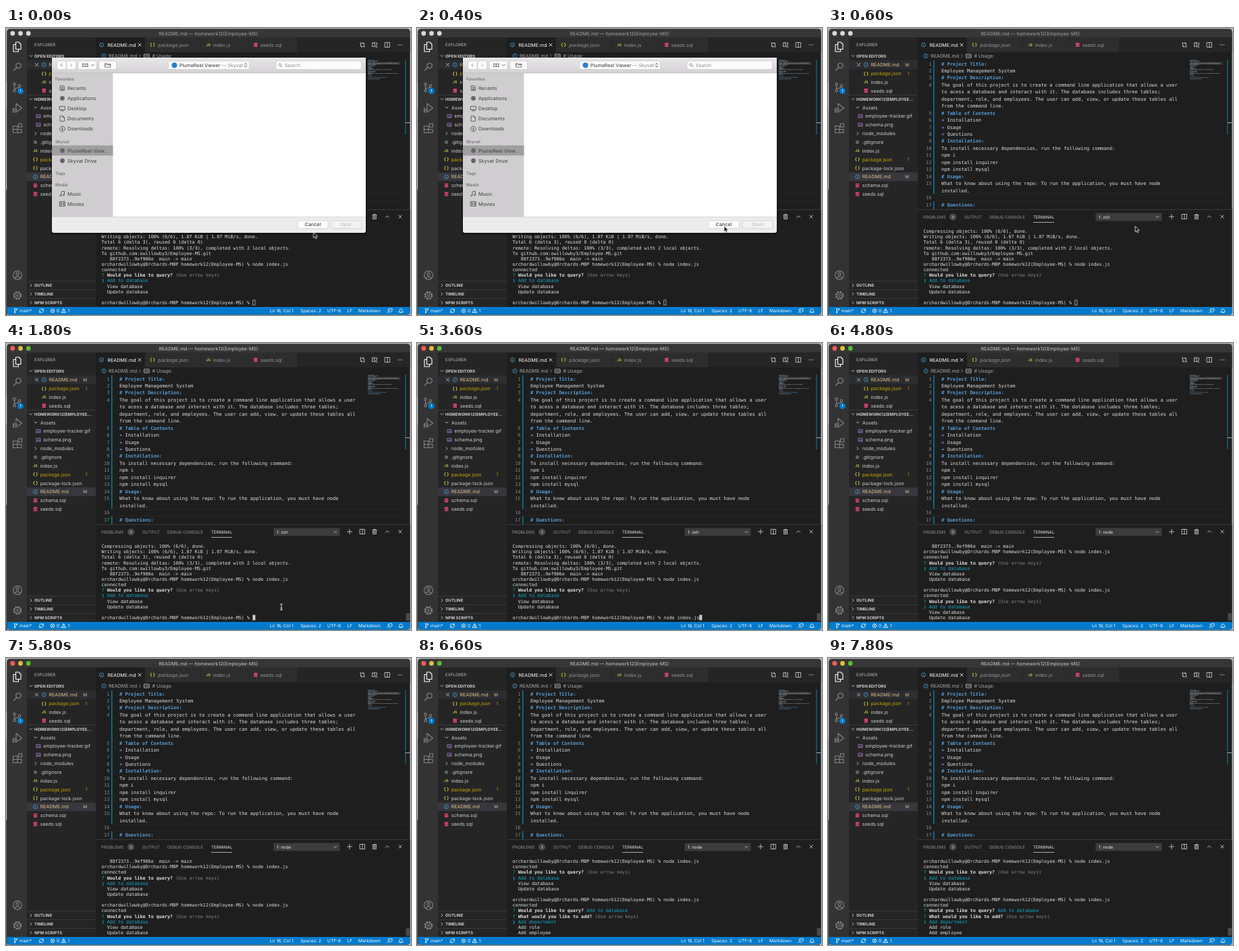
Recreate the animation shown at these times as an HTML page. Size 600 px wide and 426 px high, loop 8000 ms.

```html
<!DOCTYPE html>
<html lang="en">
<head>
<meta charset="utf-8">
<title>Editor session</title>
<style>
html, body { margin: 0; width: 100%; height: 100%; overflow: hidden; background: #1e1e1e; }
svg { display: block; width: 100vw; height: 100vh; }
text { font-family: Inter, Roboto, sans-serif; white-space: pre; text-rendering: geometricPrecision; }
.mono { font-family: "DejaVu Sans Mono", "Liberation Mono", monospace; }
.bold { font-weight: 700; }
.semi { font-weight: 600; }
.italic { font-style: italic; }
.mid { text-anchor: middle; }
.end { text-anchor: end; }
.green { fill: #0dbc79; }
.cyan { fill: #11a8cd; }
.hint { fill: #858585; }
.line { fill: none; stroke-linecap: round; stroke-linejoin: round; }
#pointer { animation: travel 8s linear infinite; }
@keyframes travel {
  0% { transform: translate(455.5px, 303px); }
  2.5%, 12.5% { transform: translate(455px, 294px); }
  20%, 100% { transform: translate(408px, 388px); }
}
</style>
</head>
<body>
<svg id="stage" viewBox="0 0 600 426" preserveAspectRatio="none"></svg>
<script>
const LOOP = 8000;
const CLOSE = 590, FOCUS = 1600, TYPE = 2500, RUN = 4400, PICK = 6000;
const KEY = 80;
let css = '', spans = 0;

const rect = (x, y, w, h, fill, more = '') =>
  `<rect x="${x}" y="${y}" width="${w}" height="${h}" fill="${fill}" ${more}/>`;
const dot = (x, y, r, fill, more = '') =>
  `<circle cx="${x}" cy="${y}" r="${r}" fill="${fill}" ${more}/>`;
const path = (x, y, d, color, width = 0.9) =>
  `<path class="line" transform="translate(${x} ${y})" d="${d}" stroke="${color}" stroke-width="${width}"/>`;
// y is the middle of the capitals
const text = (x, y, size, fill, str, cls = '') =>
  `<text x="${x}" y="${y + size * 0.36}" font-size="${size}" fill="${fill}" class="${cls}">${str}</text>`;
const tint = (cls, str) => `<tspan class="${cls}">${str}</tspan>`;

// Shows content only between two times of the loop
const span = (from, to, content) => {
  const name = `span${spans++}`;
  css += `@keyframes ${name}{0%{opacity:${from ? 0 : 1}}${from / LOOP * 100}%{opacity:1}` +
    `${to / LOOP * 100}%,100%{opacity:${to === LOOP ? 1 : 0}}}`;
  return `<g style="animation:${name} ${LOOP}ms step-end infinite">${content}</g>`;
};

const shapes = {
  down: 'M-2-1L0 1L2-1', up: 'M-2.6 1.3L0-1.3L2.6 1.3', right: 'M-1-2L1 0L-1 2', left: 'M1-2L-1 0L1 2',
  cross: 'M-2.2-2.2L2.2 2.2M2.2-2.2L-2.2 2.2', plus: 'M-3.5 0H3.5M0-3.5V3.5',
  split: 'M-3.5-3.5H3.5V3.5H-3.5ZM0-3.5V3.5',
  trash: 'M-3-2.5H3M-1-2.5V-3.6H1V-2.5M-2.4-2.5V3.5H2.4V-2.5M-.8-1V2M.8-1V2',
  branch: 'M-1.5-2V2M1.5-1.5C1.5 .5-1.5 0-1.5 1.5M-1.5-3.4a.7.7 0 1 0 .01 0M1.5-3a.7.7 0 1 0 .01 0M-1.5 2a.7.7 0 1 0 .01 0',
  lens: 'M1.5-5a3.8 3.8 0 1 0 .01 0M-1.2 1.5L-5.5 6'
};
const icon = (x, y, shape, color = '#c5c5c5', width = 0.9) => path(x, y, shapes[shape], color, width);

const fileIcon = {
  info: (x, y) => dot(x, y, 3, 'none', 'stroke="#4596c7" stroke-width=".9"') + text(x, y, 5, '#4596c7', 'i', 'mid bold'),
  json: (x, y) => text(x, y, 6.6, '#cbcb41', '{ }', 'mid bold'),
  js: (x, y) => text(x, y, 5.2, '#cbcb41', 'JS', 'mid bold'),
  sql: (x, y) => [-3, -0.9, 1.2].map(d => rect(x - 2.9, y + d, 5.8, 1.7, '#e0456e', 'rx=".8"')).join(''),
  image: (x, y) => path(x, y, 'M-2.8-2.4H2.8V2.2H-2.8ZM-2 1.4L-.4-.6L.7.8L1.4 0L2.4 1.4', '#a074c4'),
  dotfile: (x, y) => dot(x, y, 2.6, '#53656f')
};

function windowFrame() {
  const lights = colors => colors.map((c, i) => dot(9.8 + i * 11.7, 8, 3.4, c)).join('');
  const caption = 'README.md — homework12(Employee-MS)';
  return rect(0, 0, 600, 426, '#b9bcbb') +
    rect(0, 240, 2, 186, '#566057') + rect(0, 80, 2, 40, '#d8dcdc') +
    rect(1.5, 1.5, 597, 424, '#1e1e1e', 'rx="4"') +
    `<path d="M1.5 14V6q0-4.5 4.5-4.5H594q4.5 0 4.5 4.5V14Z" fill="#363636"/>` +
    span(0, FOCUS, lights(['#d8d8d8', '#d8d8d8', '#d8d8d8']) + text(300, 8, 7.05, '#a5a5a5', caption, 'mid')) +
    span(FOCUS, LOOP, lights(['#fc5b57', '#e5bf3c', '#57c038']) + text(300, 8, 7.05, '#cccccc', caption, 'mid'));
}

function activityBar() {
  const gray = '#858585';
  return rect(1.5, 14, 29.5, 400, '#333333') +
    path(16.5, 28, 'M-2-7H2.5L5.5-4V3.5H-2ZM-2-3.5H-5.5V7H2V3.5', '#ffffff', 1.1) +
    icon(17, 57, 'lens', gray, 1.2) +
    path(16, 88, 'M-3.5-6.5a1.8 1.8 0 1 0 .01 0M4-4a1.8 1.8 0 1 0 .01 0M-3.5 3a1.8 1.8 0 1 0 .01 0M-3.5-3V3M4-.4C4 2-3 0-3.5 3', gray, 1.1) +
    dot(21.3, 93.5, 4.6, '#007acc') + text(21.3, 93.5, 5.2, '#fff', '1', 'mid semi') +
    path(17, 119, 'M-2-1V-7L6.5 0L0 4.5M-4 0a2.4 3 0 1 0 .01 0M-7 1L-5.8 2M-7 6L-5.8 5M-1 1L-2.2 2M-1 6L-2.2 5M-6 3H-2', gray, 1.1) +
    path(17, 149, 'M-6.5-3.5H0V6.5H-6.5ZM-6.5 1.5H6V6.5H0M1.5-7H6.5V-2H1.5Z', gray, 1.1) +
    dot(17, 367, 6.4, 'none', `stroke="${gray}" stroke-width="1.1"`) +
    path(17, 367, 'M0-3.6a2.1 2.1 0 1 0 .01 0M-4 4.6C-3.4 1.4 3.4 1.4 4 4.6', gray, 1.1) +
    dot(17, 397, 5.3, 'none', `stroke="${gray}" stroke-width="2" stroke-dasharray="2.6 1.56"`) +
    dot(17, 397, 4.2, 'none', `stroke="${gray}" stroke-width="1"`) +
    dot(17, 397, 1.6, 'none', `stroke="${gray}" stroke-width="1"`);
}

function sidebar() {
  const plain = '#d0d0d0', warn = '#cca700', changed = '#e2c08d';
  const heading = (y, str, shape) => icon(37, y, shape) + text(42, y, 6, plain, str, 'bold');
  const border = y => rect(31, y, 102, 0.6, '#474748');
  const file = (x, y, kind, name, color = plain, mark = '', cls = '') =>
    fileIcon[kind](x - 7.2, y) + text(x, y, 7.1, color, name, cls) +
    (mark ? text(120, y, 6.4, color, mark, 'end') : '');
  const folder = (y, name, shape) => icon(44, y, shape) + text(51, y, 7.1, plain, name);
  const pitch = 12.85;
  const row = n => 118 + n * pitch;
  return rect(31, 14, 102, 400, '#252526') +
    text(42, 25, 6.1, '#bbbbbb', 'EXPLORER') +
    heading(41.5, 'OPEN EDITORS', 'down') +
    rect(31, 48, 102, pitch, '#2c2d30') + icon(45.5, 54.5, 'cross') +
    file(63.5, 54.5, 'info', 'README.md', changed, 'M') +
    file(63.5, 67.3, 'json', 'package.json', warn, '1', 'italic') +
    file(63.5, 80, 'js', 'index.js') +
    file(63.5, 93, 'sql', 'seeds.sql') +
    border(99.2) + heading(105.6, 'HOMEWORK12(EMPLOYEE…', 'down') +
    folder(row(0), 'Assets', 'down') +
    file(55.3, row(1), 'image', 'employee-tracker.gif') +
    file(55.3, row(2), 'image', 'schema.png') +
    folder(row(3), 'node_modules', 'right') +
    file(50.7, row(4), 'dotfile', '.gitignore') +
    file(50.7, row(5), 'js', 'index.js') +
    file(50.7, row(6), 'json', 'package.json', warn, '1') +
    file(50.7, row(7), 'json', 'package-lock.json') +
    rect(31, row(7.5), 102, pitch, '#37373d') +
    file(50.7, row(8), 'info', 'README.md', changed, 'M') +
    file(50.7, row(9), 'sql', 'schema.sql') +
    file(50.7, row(10), 'sql', 'seeds.sql') +
    ['OUTLINE', 'TIMELINE', 'NPM SCRIPTS'].map((name, i) => {
      const y = 382 + i * 12.8;
      return border(y - 6.4) + heading(y, name, 'right');
    }).join('');
}

function tabs() {
  return rect(133, 14, 465.5, 22, '#252526') + rect(133, 14, 72.5, 22, '#1e1e1e') +
    rect(206, 14, 82.5, 22, '#2d2d2d') + rect(289, 14, 69.5, 22, '#2d2d2d') + rect(359, 14, 72, 22, '#2d2d2d') +
    fileIcon.info(141.5, 25) + text(150.5, 25, 7.1, '#ffffff', 'README.md') + icon(198, 25, 'cross', '#e0e0e0') +
    fileIcon.json(217, 25) + text(225.3, 25, 7.1, '#969696', 'package.json', 'italic') +
    fileIcon.js(299.8, 25) + text(306.8, 25, 7.1, '#969696', 'index.js') +
    fileIcon.sql(369.8, 25) + text(376.8, 25, 7.1, '#969696', 'seeds.sql') +
    path(528, 25, 'M-2.5-3.5a1 1 0 1 0 .01 0M2.5 1.5a1 1 0 1 0 .01 0M-2.5-1.5V2.5H0M2.5 1.5V-2.5H0M-1 1.5L0 2.5L-1 3.5M1-3.5L0-2.5L1-1.5', '#c5c5c5') +
    path(546, 25, 'M-3.5 2.5V-3H3.5V0M-3.5 2.5H0M-.5-3V0M1.5 .3a1.5 1.5 0 1 0 .01 0M2.7 2.8L4 4', '#c5c5c5') +
    icon(565, 25, 'split') + [-2.6, 0, 2.6].map(d => dot(584 + d, 25, 0.7, '#c5c5c5')).join('') +
    fileIcon.info(145, 41.5) + text(152, 41.5, 7.1, '#a9a9a9', 'README.md') + icon(198.5, 41.5, 'right', '#a9a9a9', 0.7) +
    path(208.5, 41.5, 'M-3.6-2.6H3.6V2.6H-3.6ZM-2 0H-1M-.4 0H.5M1.1 0H2', '#c5c5c5') +
    text(216.5, 41.5, 7.1, '#a9a9a9', '# Usage:');
}

// A leading space marks a wrapped row
const source = [
  '# Project Title:', 'Employee Management System', '# Project Description:',
  'The goal of this project is to create a command line application that allows a user',
  ' to acess a database and interact with it. The database includes three tables;',
  ' department, role, and employees. The user can add, view, or update these tables all',
  ' from the command line.',
  '# Table of Contents', '* Installation', '* Usage', '* Questions', '# Installation:',
  'To install necessary dependencies, run the following command:',
  'npm i', 'npm install inquirer', 'npm install mysql', '# Usage:',
  'What to know about using the repo: To run the application, you must have node',
  ' installed.', '', '# Questions:'
];

function editor() {
  const top = 53, pitch = 10.45, size = 7.01;
  const blue = '#0c7d9d';
  let number = 0;
  let out = rect(160, 246.6, 431, 0.6, '#2b2b2b') + rect(160, 256.6, 431, 0.6, '#2b2b2b');
  source.forEach((line, i) => {
    const y = top + i * pitch;
    const head = line[0] === '#';
    if (line[0] !== ' ') {
      number++;
      out += text(153.5, y, size, '#858585', number, 'mono end');
    }
    const body = line[0] === '*' ? `<tspan fill="#6796e6" class="bold">∗</tspan>${line.slice(1)}` : line.trim();
    out += text(168, y, size, head ? '#569cd6' : '#e0e0e0', body, head ? 'mono bold' : 'mono');
    for (const word of line.trim().matchAll(/\S+/g))
      out += rect(536 + word.index * 0.58, 47.3 + i * 1.17, word[0].length * 0.58, 0.8, head ? '#569cd6' : '#b0b0b0', 'opacity=".6"');
  });
  // Only the current, empty line is unchanged, so the change bars break there
  return out + rect(156, 48, 1.5, 198.5, blue) + rect(156, 257, 1.5, 12, blue) +
    rect(536, 72.8, 28, 0.8, '#569cd6', 'opacity=".6"') + rect(536, 75, 18, 0.8, '#b0b0b0', 'opacity=".5"') +
    rect(591, 47, 1.5, 92, blue, 'opacity=".7"') + rect(591, 142, 1.5, 16, blue, 'opacity=".7"') +
    rect(591, 140, 7.5, 1.2, '#a0a0a0');
}

function panel() {
  const y = 280.5, gray = '#969696';
  return rect(133, 269, 465.5, 145, '#1e1e1e') + rect(133, 269.3, 465.5, 0.7, '#454545') +
    text(141, y, 6.2, gray, 'PROBLEMS') + dot(185, y, 5, '#4d4d4d') + text(185, y, 5.6, '#fff', '1', 'mid') +
    text(202, y, 6.2, gray, 'OUTPUT') + text(239, y, 6.2, gray, 'DEBUG CONSOLE') +
    text(304, y, 6.2, '#e7e7e7', 'TERMINAL') + rect(304, 288, 31, 0.7, '#e7e7e7') +
    rect(396.5, 274.6, 98, 11.8, '#3c3c3c') + icon(488, y, 'down') +
    span(0, RUN, text(401, y, 6.3, '#f0f0f0', '1: zsh')) +
    span(RUN, LOOP, text(401, y, 6.3, '#f0f0f0', '1: node')) +
    icon(509, 280, 'plus') + icon(528, 280, 'split') + icon(546, 280, 'trash') +
    icon(565, 280, 'up') + icon(584, 280, 'cross');
}

function terminal() {
  const left = 141.5, top = 301.7, pitch = 8.14, size = 6.76, cell = 4.07, gray = '#e2e2e2';
  const prompt = 'orchardwillowby@Orchards-MBP homework12(Employee-MS) % ';
  const command = 'node index.js';
  const run = [prompt + command, 'connected'];
  const ask = (question, tail) => `${tint('green', '?')} ${tint('bold', question)} ${tail}`;
  const arrows = tint('hint', '(Use arrow keys)');
  const pick = str => tint('cyan', '❯ ' + str);
  const menu = [ask('Would you like to query?', arrows), pick('Add to database'), '  View database', '  Update database'];
  const lines = rows => rows.map((row, i) => text(left, top + i * pitch, size, gray, row, 'mono')).join('');

  const before = [
    'Compressing objects: 100% (6/6), done.',
    'Writing objects: 100% (6/6), 1.07 KiB | 1.07 MiB/s, done.',
    'Total 6 (delta 3), reused 0 (delta 0)',
    'remote: Resolving deltas: 100% (3/3), completed with 2 local objects.',
    'To github.com:owillowby3/Employee-MS.git',
    '   88f2373..9ef906e  main -&gt; main',
    ...run, ...menu, '', prompt
  ];
  const session = [...run, ...menu, '', ...run];
  const listed = [before[5], ...session, ...menu];
  const picked = [...session, ask('Would you like to query?', tint('cyan', 'Add to database')),
    ask('What would you like to add?', arrows), pick('Add department'), '  Add role', '  Add employee'];

  const y = top + 13 * pitch;
  const column = n => left + (prompt.length + n) * cell;
  let typing = span(0, FOCUS, rect(column(0) + 0.4, y - 3.6, 3.3, 7.2, 'none', 'stroke="#cccccc" stroke-width=".7"'));
  for (let i = 0; i <= command.length; i++) {
    const from = i ? TYPE + (i - 1) * KEY : FOCUS;
    const to = i < command.length ? TYPE + i * KEY : RUN;
    typing += span(from, to, rect(column(i), y - 4, cell, 8, '#cccccc'));
    if (i < command.length) typing += span(to, RUN, text(column(i), y, size, gray, command[i], 'mono'));
  }
  return span(0, RUN, lines(before)) + typing +
    span(RUN, PICK, lines(listed)) + span(PICK, LOOP, lines(picked)) +
    span(FOCUS, LOOP, rect(592.5, 401, 6, 11, '#4a4a4a'));
}

function statusBar() {
  const item = (x, str) => text(x, 419.7, 6.6, '#ffffff', str);
  const sign = (x, d) => path(x, 419.7, d, '#ffffff', 0.8);
  return `<path d="M1.5 414H598.5V422q0 3.5-3.5 3.5H5q-3.5 0-3.5-3.5Z" fill="#007acc"/>` +
    icon(14.5, 419.7, 'branch', '#ffffff', 0.8) + item(20, 'main*') +
    sign(52.5, 'M-3 .5A3 3 0 0 1 2.5-1.5M3-.5A3 3 0 0 1-2.5 1.5M2.7-3V-1.3H1M-2.7 3V1.3H-1') +
    dot(69, 419.7, 2.8, 'none', 'stroke="#fff" stroke-width=".8"') + sign(69, 'M-1.1-1.1L1.1 1.1M1.1-1.1L-1.1 1.1') + item(75, '0') +
    sign(85.5, 'M0-2.9L3.2 2.7H-3.2ZM0-1V.8M0 1.7V1.8') + item(91.5, '1') +
    item(391, 'Ln 16, Col 1') + item(436, 'Spaces: 2') + item(476, 'UTF-8') + item(505.5, 'LF') + item(522, 'Markdown') +
    sign(568.5, 'M-1.5-2.6a1.3 1.3 0 1 0 .01 0M-3.5 3C-3.5 .4 .5 .4 .5 3M0-3H3.5V.5H2L1 1.5') +
    sign(585, 'M-3 1.8C-1.8 .6-2.6-2.8 0-2.8S1.8 .6 3 1.8ZM-.7 2.9H.7');
}

function dialog() {
  const ink = '#3f3f3f', edge = 'rx="2" stroke="#bdbbbd" stroke-width=".5"';
  const button = (x, y, w, h = 12.5, fill = '#fcfcfc') => rect(x, y, w, h, fill, edge);
  const group = (y, str) => text(73, y, 6.3, '#777577', str, 'semi');
  const glyphs = {
    recents: 'M-3-3.5H1.5L3-2V3.5H-3ZM-1.5-1H1.5M-1.5 .8H1.5M-1.5 2.4H1.5',
    desktop: 'M-3.8-3H3.8V2H-3.8ZM-2 3.5H2',
    documents: 'M-3-3.8H1L3-1.8V3.8H-3ZM1-3.8V-1.8H3',
    downloads: 'M0-3.9a3.9 3.9 0 1 0 .01 0M0-2V1.8M-1.5 .4L0 1.9L1.5 .4',
    music: 'M-1.5 2.6V-3L3-3.8V1.8M-2.8 1.8a1 1 0 1 0 .01 0M1.8 .8a1 1 0 1 0 .01 0',
    movies: 'M-3.8-3.2H3.8V3.2H-3.8ZM-2.2-3.2V3.2M2.2-3.2V3.2M-2.2 0H2.2'
  };
  const place = (y, name, glyph) =>
    (glyph ? path(83.5, y, glyphs[glyph], '#555355', 0.9) : dot(83.5, y, 3.4, '#666466')) + text(91, y, 7.25, ink, name);
  return rect(66, 44, 469, 263, '#000', 'rx="4" opacity=".25"') + rect(68, 44, 465, 260, '#ececec', 'rx="3"') +
    rect(68, 44, 465, 23, 'url(#bar)') + rect(68, 67, 90.5, 213, '#cfcdcf') +
    rect(158.5, 67, 374.5, 213, '#ffffff') + rect(68, 66.6, 465, 0.6, '#b5b3b5') + rect(68, 280, 465, 0.6, '#c9c9c9') +
    button(75.5, 49, 13.5) + button(90, 49, 13.5) + icon(82, 55.2, 'left', '#777') + icon(96.7, 55.2, 'right', '#999') +
    button(107, 49, 27) + [0, 1, 2, 3, 4, 5].map(i => rect(113 + i % 3 * 3.3, 52.6 + (i > 2 ? 3.2 : 0), 2.2, 2, '#666')).join('') +
    icon(128.5, 55.3, 'down', '#555') +
    button(138, 49, 25.5) + path(150.8, 55.3, 'M-4-2.8H-1L0-1.8H4V2.8H-4ZM-4-.6H4', '#666') +
    button(240.5, 49, 120) + dot(249.5, 55.2, 4, '#2c7fce') +
    text(257, 55.2, 7.1, '#333', `PlumeReel Viewer <tspan fill="#888">— Skyvat</tspan>`) +
    path(355, 55.2, 'M-1.6-1L0-2.8L1.6-1M-1.6 1L0 2.8L1.6 1', '#444') +
    button(400, 49, 126.5) + `<g transform="translate(406.5 55.2) scale(-.48 .48)">${icon(0, 0, 'lens', '#777', 1.7)}</g>` +
    text(413, 55.2, 7, '#8b8b8b', 'Search') +
    group(76, 'Favorites') + place(89.2, 'Recents', 'recents') + place(104.3, 'Applications') +
    place(119.4, 'Desktop', 'desktop') + place(134.6, 'Documents', 'documents') + place(149.8, 'Downloads', 'downloads') +
    group(169, 'Skyvat') + rect(68, 174.3, 90.5, 15, '#a09ea0') + place(181.9, 'PlumeReel View…') + place(197, 'Skyvat Drive') +
    group(216, 'Tags') + group(233, 'Media') + place(246, 'Music', 'music') + place(261, 'Movies', 'movies') +
    button(432, 286, 45, 11.5) + text(454.5, 291.8, 7.1, '#222', 'Cancel', 'mid') +
    button(482, 286, 45, 11.5, '#f3f3f3') + text(504.5, 291.8, 7.1, '#bdbdbd', 'Open', 'mid');
}

function pointer() {
  const arrow = '<path d="M0 0V8.6L2 6.8L3.3 9.8L4.8 9.1L3.5 6.2H6.2Z" fill="#111" stroke="#eee" stroke-width=".8"/>';
  const beam = path(0, 4, 'M-1.6-4.6Q0-4.6 0-3.4Q0-4.6 1.6-4.6M0-3.6V3.6M-1.6 4.6Q0 4.6 0 3.4Q0 4.6 1.6 4.6M-1 1.6H1', '#e8e8e8', 0.9);
  return `<g id="pointer">${span(0, FOCUS, arrow)}${span(FOCUS, TYPE, beam)}</g>`;
}

const gradient = '<defs><linearGradient id="bar" x2="0" y2="1"><stop stop-color="#e9e7e9"/><stop offset="1" stop-color="#d3d1d3"/></linearGradient></defs>';
document.getElementById('stage').innerHTML = gradient + windowFrame() + activityBar() + sidebar() + tabs() +
  editor() + panel() + terminal() + statusBar() + span(0, CLOSE, dialog()) + pointer();
document.head.appendChild(document.createElement('style')).textContent = css;
</script>
</body>
</html>
```
